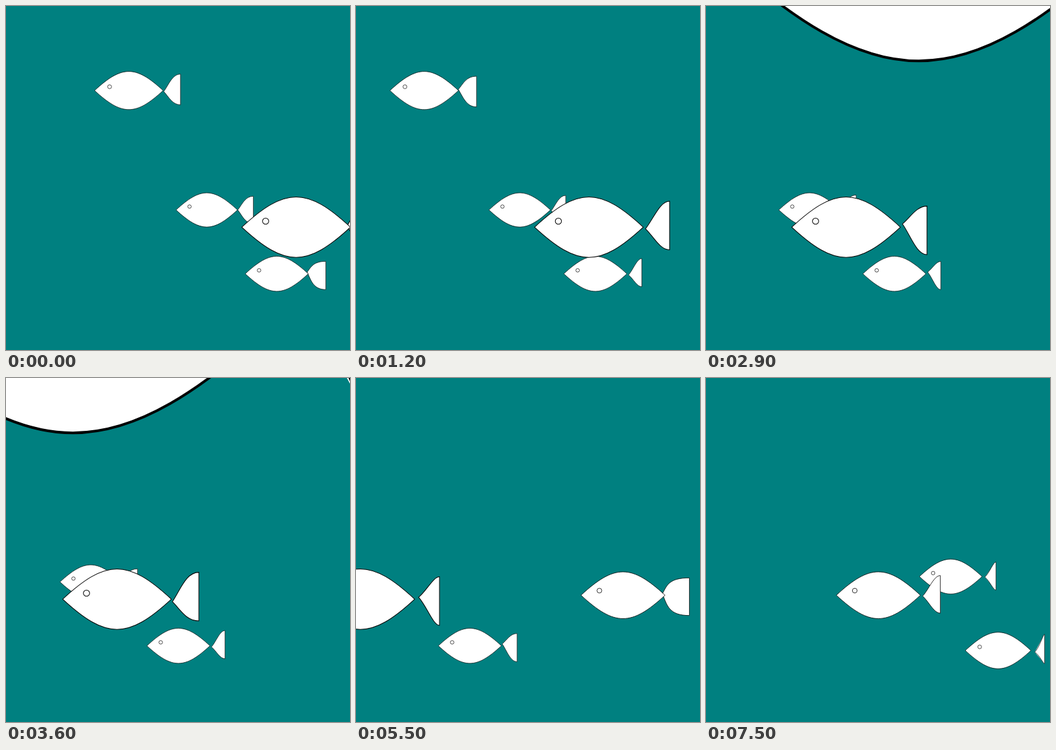
Write an HTML page that moves like this. It is 532 px wide and 534 px high and loops after 7600 ms.

```html
<!DOCTYPE html>
<html lang="en">
<head>
<meta charset="utf-8">
<title>Fish</title>
<style>
  html, body { margin: 0; width: 100%; height: 100%; overflow: hidden; background: #008080; }
  svg { display: block; width: 532px; height: 534px; }
  path, circle { fill: #fff; stroke: #000; }
  .under { stroke: none; }
</style>
</head>
<body>
<svg id="sea" viewBox="0 0 532 534"></svg>
<script>
const STEP_MS = 100, STEPS = 76;

// [step, distance swum]
const travel = [[0, 0], [8, 53], [12, 88.5], [22, 183], [24, 198], [32, 252.5],
  [36, 277], [46, 371], [55, 442], [64, 518], [75, 612]];

// Back to front. tail: [step, stretch, sway in degrees]
const school = [
  { x: 263, y: 316.6, w: 95, speed: .648, from: 0, to: 37,
    tail: [[0, .2, 270], [12, 0, -115], [36, .3, -790], [37, .3, -810]] },
  { x: 370, y: 415.7, w: 97.5, speed: .549, from: 0, to: 68,
    tail: [[0, .7, 330], [12, -.3, 126], [22, -.4, -180], [36, -.25, -486],
      [46, .1, -790], [55, 0, -1060], [68, -.2, -1400]] },
  { x: 137, y: 131.2, w: 106, speed: .955, from: 0, to: 12,
    tail: [[0, .1, 240], [12, .35, -60]] },
  { x: 758.4, y: 308.2, w: 97, speed: .7, from: 56, to: 75,
    tail: [[56, .5, 605], [75, -.7, 105]] },
  { x: 860, y: 423, w: 101.5, speed: .75, from: 69, to: 75,
    tail: [[69, .5, 300], [75, -1, 140]] },
  { x: 728.5, y: 337.2, w: 130, speed: .861, from: 38, to: 75,
    tail: [[38, .5, 745], [55, 1, 305], [75, -.3, -250]] },
  { x: 364.7, y: 343.3, w: 168, speed: 1, from: 0, to: 55,
    tail: [[0, .9, 310], [12, -.15, 120], [22, -.3, -195], [36, .1, -500],
      [46, .25, -795], [55, -.5, -1025]] },
  { x: 1170, y: -95.5, w: 648, speed: 5.02, from: 13, to: 55,
    tail: [[13, 0, 0], [36, -1.2, -440], [46, 0, -800], [55, 0, -1030]] }
];

const sea = document.getElementById('sea');

function add(parent, name, attrs = {}) {
  const node = document.createElementNS('http://www.w3.org/2000/svg', name);
  for (const key in attrs) node.setAttribute(key, attrs[key]);
  return parent.appendChild(node);
}

// Linear interpolation of column `col` in rows sorted by step
function sample(rows, step, col) {
  let i = 1;
  while (i < rows.length - 1 && rows[i][0] < step) i++;
  const a = rows[i - 1], b = rows[i];
  const t = Math.min(1, Math.max(0, (step - a[0]) / (b[0] - a[0])));
  return a[col] + (b[col] - a[col]) * t;
}

function bodyPath(w) {
  const bend = w * .372;
  return `M0 0C${w * .4} ${-bend} ${w * .6} ${-bend} ${w} 0` +
    `C${w * .6} ${bend} ${w * .4} ${bend} 0 0Z`;
}

function tailShape(fish, step) {
  const unit = fish.w / 98;
  const stretch = sample(fish.tail, step, 1);
  const sway = Math.cos(sample(fish.tail, step, 2) * Math.PI / 180);
  const tipX = fish.w + (1.4 - 4.4 * stretch) * unit;
  const tipY = -3 * sway * unit;
  const edge = fish.w + (24.4 + 4 * stretch) * unit;
  const top = (3 * sway - 22) * unit, bottom = (3 * sway + 22) * unit;
  const length = edge - tipX;
  const nearX = tipX + (.32 - .15 * stretch) * length;
  const farX = edge - (.45 + .3 * stretch) * length;
  const nearY = y => tipY + (.4 + .15 * stretch) * (y - tipY);
  return {
    chord: `M${tipX} ${tipY}L${edge} ${top}V${bottom}Z`,
    curve: `M${tipX} ${tipY}C${nearX} ${nearY(top)} ${farX} ${top} ${edge} ${top}` +
      `V${bottom}C${farX} ${bottom} ${nearX} ${nearY(bottom)} ${tipX} ${tipY}Z`
  };
}

for (const fish of school) {
  const { w } = fish;
  fish.group = add(sea, 'g', { 'stroke-width': Math.max(.7, w / 160) });
  fish.chord = add(fish.group, 'path', { class: 'under' });
  fish.curve = add(fish.group, 'path');
  add(fish.group, 'path', { d: bodyPath(w) });
  add(fish.group, 'circle', { cx: w * .219, cy: w * -.055, r: w * .0285 });
}

function draw(step) {
  const distance = sample(travel, step, 1);
  for (const fish of school) {
    const visible = step >= fish.from && step <= fish.to;
    fish.group.setAttribute('display', visible ? 'inline' : 'none');
    if (!visible) continue;
    const tail = tailShape(fish, step);
    fish.group.setAttribute('transform', `translate(${fish.x - fish.speed * distance} ${fish.y})`);
    fish.chord.setAttribute('d', tail.chord);
    fish.curve.setAttribute('d', tail.curve);
  }
}

const start = performance.now();
function tick() {
  draw(Math.floor((performance.now() - start) / STEP_MS) % STEPS);
  requestAnimationFrame(tick);
}
tick();
</script>
</body>
</html>
```
